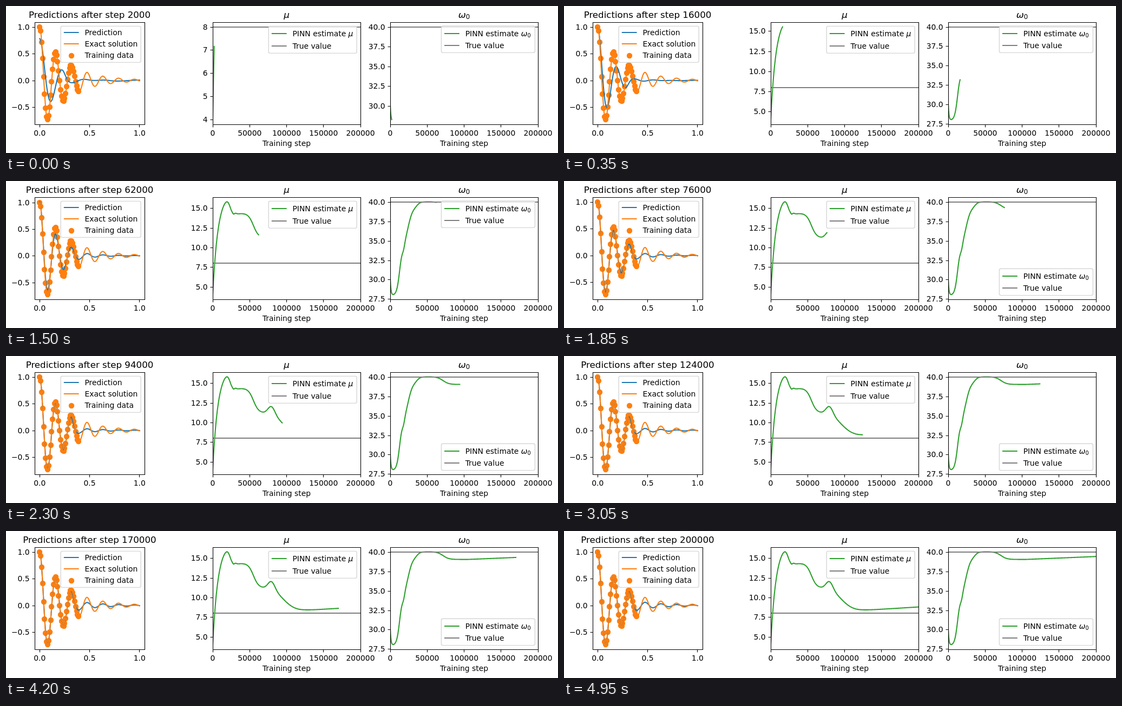
An HTML page that plays this animation: 1020 by 272 pixels, repeating every 5 s.

```html
<!DOCTYPE html>
<html lang="en">
<head>
<meta charset="utf-8">
<title>Training progress</title>
<style>
html, body { margin: 0; width: 100%; height: 100%; overflow: hidden; background: #fff; }
svg { display: block; width: 1020px; height: 272px; font: 13.89px "DejaVu Sans", sans-serif; }
.title { font-size: 16.67px; }
.curve { fill: none; stroke-width: 2.08; stroke-linejoin: round; stroke-linecap: square; }
.axis { fill: none; stroke: #000; stroke-width: 1.1; }
.box { fill: #fff; fill-opacity: .8; stroke: #ccc; stroke-opacity: .8; stroke-width: 1.39; }
</style>
</head>
<body>
<svg id="stage" viewBox="0 0 1020 272"></svg>
<script>
const BLUE = '#1f77b4', ORANGE = '#ff7f0e', GREEN = '#2ca02c', GRAY = '#7f7f7f';
const TOP = 29.95, BOTTOM = 218.7, HEIGHT = BOTTOM - TOP;
const FRAMES = 100, FRAME_MS = 50;
const MU = '<tspan font-style="italic">μ</tspan>';
const OMEGA = '<tspan font-style="italic">ω</tspan><tspan font-size="70%" dy="2.4">0</tspan>';

const rise = (s, mid, width) => 1 / (1 + Math.exp((mid - s) / width));
const bump = (s, mid, width) => Math.exp(-((s - mid) ** 2) / (2 * width * width));
const smooth = (a, b, t) => {
  const u = Math.min(1, Math.max(0, (t - a) / (b - a)));
  return u * u * (3 - 2 * u);
};

// Estimates by thousand steps: a fast climb, settling drops, then a slow drift.
const muAt = s => 17 - 13 * Math.exp(-s / 7.2)
  - 2.6 * rise(s, 23.4, 1.95) - 3.1 * rise(s, 55, 3.5) - 3 * rise(s, 95.5, 8)
  - .1 * bump(s, 28.2, 1) + .1 * bump(s, 30.8, 1.5) + 1.08 * bump(s, 79.5, 4.7)
  + .0058 * Math.max(0, s - 115);

const omegaAt = s => 27.92 + 2.08 * Math.exp(-s)
  + 5.4 * rise(s, 12.5, 1.9) + 6.75 * rise(s, 24, 4) - rise(s, 71.5, 4)
  - .45 * bump(s, 18, 1.6) - .25 * bump(s, 33.5, 3.5)
  + .004 * Math.max(0, s - 105);

// Oscillator released at rest from 1.
function swing(t, d, w) {
  return Math.exp(-d * t) * (Math.cos(w * t) + d / w * Math.sin(w * t));
}
const W = Math.sqrt(40 ** 2 - 4 ** 2);
const exact = t => swing(t, 4, W);
const lowest = exact(Math.PI / W);

// The network follows the data up to a knee and damps too much after it.
function predictor(s) {
  const start = 1 - .33 * Math.exp(-s / 5) + .012 * bump(s, 60, 10);
  const damping = 7.5 - 3.5 * rise(s, 62, 11) - 1.6 * Math.exp(-s / 8);
  const freq = 28.2 + 11.5 * rise(s, 16, 4);
  const knee = .3 - .09 * Math.exp(-s / 10);
  const level = .4 + .3 * bump(s, 60, 10) - .18 * bump(s, 105, 35);
  const drift = .011 * Math.exp(-s / 12);
  return t => start * swing(t, damping, freq) * Math.pow(level, smooth(knee, knee + .12, t))
    + drift * smooth(.38, .55, t) * Math.cos(4 * Math.PI * (t - .54));
}

const crisp = v => Math.floor(v) + .5;
const text = (s, x, y, anchor = 'start', cls = '') =>
  `<text x="${x}" y="${y}" text-anchor="${anchor}" class="${cls}">${s}</text>`;
const stroke = (pts, color) =>
  `<polyline class="curve" stroke="${color}" points="${pts.map(p => p[0].toFixed(2) + ',' + p[1].toFixed(2)).join(' ')}"/>`;
const bar = (x1, x2, y, color) =>
  `<path d="M${x1} ${Math.round(y)}H${x2}" stroke="${color}" stroke-width="2"/>`;
const dot = (x, y) =>
  `<circle cx="${Math.round(x)}" cy="${Math.round(y)}" r="5.2" fill="${ORANGE}"/>`;
const clip = (id, x, w, body) =>
  `<clipPath id="${id}"><rect x="${x}" y="${TOP}" width="${w}" height="${HEIGHT}"/></clipPath>`
  + `<g clip-path="url(#${id})">${body}</g>`;

function limits(min, max) {
  const pad = (max - min) * .05;
  return [min - pad, max + pad];
}

function yTicks(lo, hi) {
  const step = [.5, 1, 2, 2.5, 5].find(s => s >= (hi - lo) / 6);
  const ticks = [];
  for (let k = Math.ceil(lo / step); k * step <= hi; k++) ticks.push(k * step);
  return ticks.map(v => [v, v.toFixed(step % 1 ? 1 : 0).replace('-', '−')]);
}

function frameAxes(x, width, title, xTicks, lo, hi, toX, toY) {
  const l = crisp(x), r = crisp(x + width), t = 30.5, b = 219.5;
  let path = `M${l} ${t}H${r}V${b}H${l}Z`, labels = '';
  for (const [v, s] of xTicks) {
    path += `M${crisp(toX(v))} ${b}v5`;
    labels += text(s, toX(v), 240, 'middle');
  }
  for (const [v, s] of yTicks(lo, hi)) {
    const y = Math.round(toY(v));
    path += `M${l} ${y + .5}h-5`;
    labels += text(s, x - 9.4, y + 5, 'end');
  }
  return `<path class="axis" d="${path}"/>` + labels
    + text(title, x + width / 2, 22, 'middle', 'title');
}

function legend(x, y, w, h, rows) {
  return `<rect class="box" x="${x}" y="${y}" width="${w}" height="${h}" rx="2.8"/>`
    + rows.map(([s, color, dy]) => {
      const cy = y + dy;
      const key = color ? bar(x + 5.6, x + 33.4, cy, color) : dot(x + 19.5, cy + .5);
      return key + text(s, x + 44.3, Math.round(cy + 4.86));
    }).join('');
}

const times = Array.from({ length: 401 }, (_, i) => i / 400);

function fitPanel(step) {
  const x = 53, width = 203, predict = predictor(step);
  const [lo, hi] = limits(lowest, Math.max(1, predict(0)));
  const toX = t => x + width * (t + .05) / 1.1;
  const toY = v => BOTTOM - (v - lo) / (hi - lo) * HEIGHT;
  const line = (f, color) => stroke(times.map(t => [toX(t), toY(f(t))]), color);
  let dots = '';
  for (let i = 0; i < 40; i++) dots += dot(toX(i / 100), toY(exact(i / 100)));
  return clip('fit', x, width, dots + line(predict, BLUE) + line(exact, ORANGE))
    + frameAxes(x, width, `Predictions after step ${step * 1000}`,
      [[0, '0.0'], [.5, '0.5'], [1, '1.0']], lo, hi, toX, toY)
    + legend(101.2, 37.4, 148, 67, [
      ['Prediction', BLUE, 11.6], ['Exact solution', ORANGE, 33], ['Training data', null, 54]
    ]);
}

const stepTicks = [0, 50, 100, 150, 200].map(v => [v, String(v * 1000)]);

function estimatePanel(id, x, symbol, data, truth, step, box) {
  const width = 273, seen = data.slice(0, step * 2 + 1);
  const [lo, hi] = limits(Math.min(truth, ...seen), Math.max(truth, ...seen));
  const toX = v => x + v / 200 * width;
  const toY = v => BOTTOM - (v - lo) / (hi - lo) * HEIGHT;
  const lines = stroke(seen.map((v, i) => [toX(i / 2), toY(v)]), GREEN)
    + bar(x, x + width, toY(truth), GRAY);
  return clip(id, x, width, lines)
    + frameAxes(x, width, symbol, stepTicks, lo, hi, toX, toY)
    + text('Training step', x + width / 2, 259, 'middle')
    + legend(...box, [
      ['PINN estimate ' + symbol, GREEN, 13.8], ['True value', GRAY, box[3] - 13.5]
    ]);
}

// One sample per 500 steps.
const sample = f => times.map(t => f(t * 200));
const mu = sample(muAt), omega = sample(omegaAt);
const stage = document.getElementById('stage');
let shown = -1;

function draw(frame) {
  const step = (frame + 1) * 2;
  // The legend gives way once the curve runs into it.
  const legendY = step < 70 ? 37 : 162.2;
  stage.innerHTML = fitPanel(step)
    + estimatePanel('mu', 382, MU, mu, 8, step, [485.2, 37.4, 163, 50])
    + estimatePanel('omega', 710, OMEGA, omega, 40, step, [804.4, legendY, 173, 49.4]);
}

function tick() {
  const frame = Math.floor(performance.now() / FRAME_MS) % FRAMES;
  if (frame !== shown) draw(shown = frame);
  requestAnimationFrame(tick);
}
tick();
</script>
</body>
</html>
```
